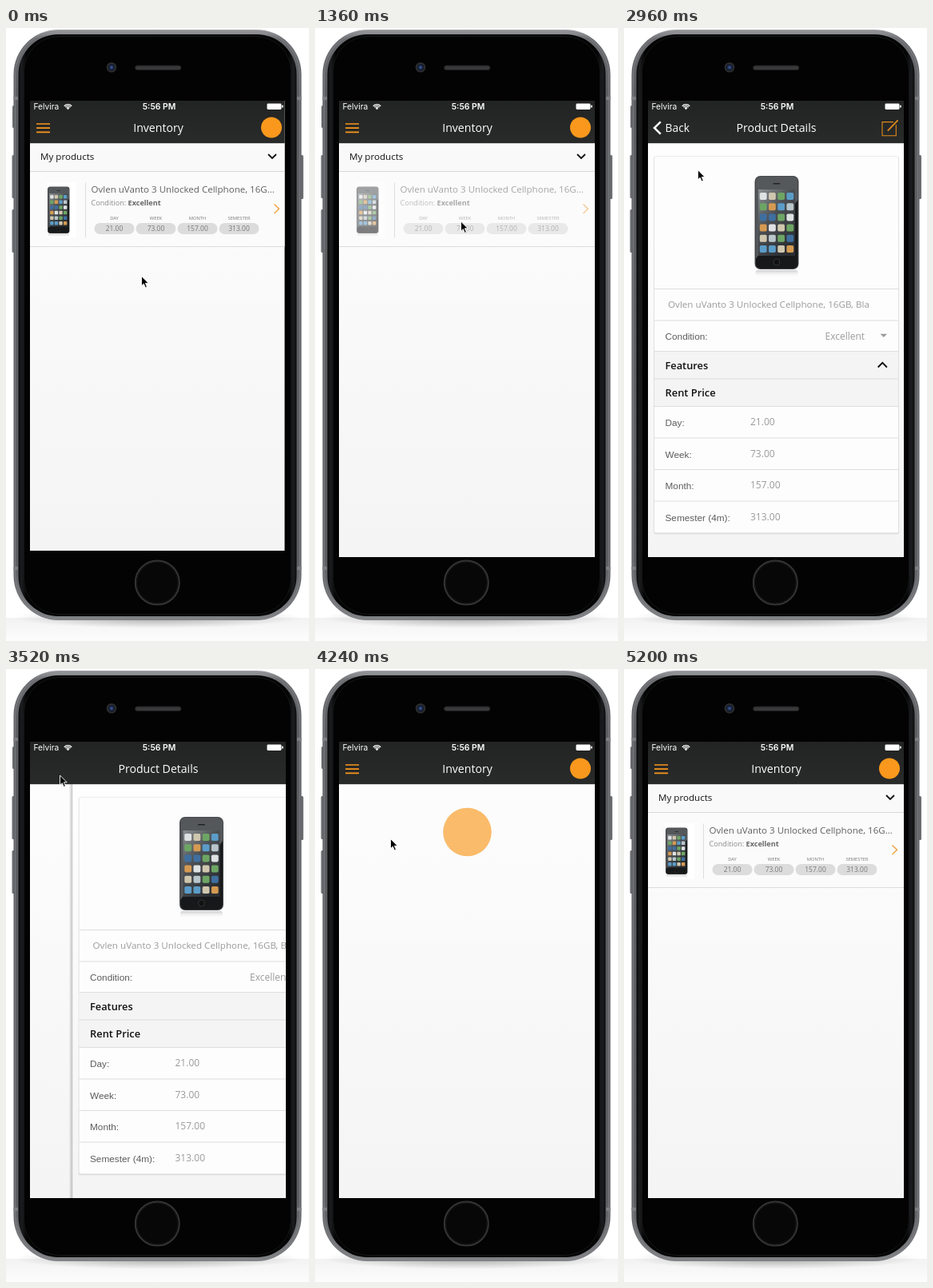
Write an HTML page that moves like this. It is 379 by 767 pixels and loops after 5.6 s.

```html
<!DOCTYPE html>
<html lang="en">
<head>
<meta charset="utf-8">
<title>Inventory app</title>
<style>
  html, body { margin: 0; width: 100%; height: 100%; overflow: hidden; background: #fff; }
  svg { display: block; width: 379px; height: 767px; }
  text { font-family: "Open Sans", "Noto Sans", sans-serif; white-space: pre; }
  .sys { font-family: Inter, Roboto, sans-serif; }
  .label { font-family: "Liberation Sans", Arial, sans-serif; font-size: 11.8px; fill: #5c5c5c; }
  .line { fill: none; stroke-linecap: butt; stroke-linejoin: miter; }
</style>
</head>
<body>
<svg id="stage" viewBox="0 0 379 767" xmlns="http://www.w3.org/2000/svg"></svg>
<script>
const LOOP = 5600, STEP = 80;
const ORANGE = '#f9981c';
const ITEM = 'Ovlen uVanto 3 Unlocked Cellphone, 16G';
const PRICES = [['Day', '21.00'], ['Week', '73.00'], ['Month', '157.00'], ['Semester', '313.00']];

const text = (x, y, size, fill, str, more = '') =>
  `<text x="${x}" y="${y}" font-size="${size}" fill="${fill}" ${more}>${str}</text>`;
const rect = (x, y, w, h, fill, r = 0, more = '') =>
  `<rect x="${x}" y="${y}" width="${w}" height="${h}" rx="${r}" fill="${fill}" ${more}/>`;
const line = (d, color, width) =>
  `<path class="line" d="${d}" stroke="${color}" stroke-width="${width}"/>`;
const grad = (id, stops, dir = 'x2="0" y2="1"') =>
  `<linearGradient id="${id}" ${dir}>` +
  stops.map(([o, c, a = 1]) => `<stop offset="${o}" stop-color="${c}" stop-opacity="${a}"/>`).join('') +
  '</linearGradient>';
const mid = 'text-anchor="middle"';

const defs = `<defs>
  ${grad('rim', [[0, '#a2a3a7'], [.015, '#6d6e72'], [.1, '#5f6064'], [.9, '#5f6064'], [1, '#808185']])}
  ${grad('gloss', [[0, '#0c0c0d'], [.012, '#1c1d1f'], [.03, '#040404'], [.97, '#040404'], [.988, '#1c1d1f'], [1, '#0c0c0d']], '')}
  ${grad('page', [[0, '#fefefe'], [1, '#f4f4f4']])}
  ${grad('bar', [[0, '#222323'], [1, '#292a2a']])}
  ${grad('edge', [[0, '#000', 0], [1, '#000', .24]], '')}
  ${grad('drop', [[0, '#000', .1], [1, '#000', .02]])}
  ${grad('glass', [[0, '#8b8f92'], [.45, '#4b4f53'], [1, '#2a2d31']], 'x2=".7" y2="1"')}
  ${grad('mirror', [[0, '#777', .35], [1, '#fff', 0]])}
  <radialGradient id="floor"><stop offset="0" stop-color="#000" stop-opacity=".3"/>
    <stop offset=".6" stop-color="#000" stop-opacity=".12"/><stop offset="1" stop-color="#000" stop-opacity="0"/></radialGradient>
  <radialGradient id="lens"><stop offset="0" stop-color="#4a66a8"/><stop offset=".5" stop-color="#1d2b52"/>
    <stop offset="1" stop-color="#111419"/></radialGradient>
  <clipPath id="screen"><rect id="screenBox" x="30" y="91" width="320" height="571"/></clipPath>
  <clipPath id="field"><rect x="50" y="330" width="256" height="32"/></clipPath>
</defs>`;

function device() {
  const keys = [[8, 97, 28], [7.5, 159, 54], [7.5, 227, 54], [368, 159, 55]]
    .map(([x, y, h]) => rect(x, y, 4, h, '#6f7074', 1.5)).join('');
  const bands = [86, 674].map(y =>
    rect(9.5, y, 5.5, 4, '#7d7e82') + rect(364, y, 5.5, 4, '#7d7e82')).join('');
  return rect(0, 738, 379, 29, 'url(#drop)', 0, 'opacity=".5"') +
    '<ellipse cx="189.5" cy="738" rx="180" ry="13" fill="url(#floor)"/>' + keys +
    rect(9.5, 2, 360, 739, 'url(#rim)', 56) +
    rect(11.5, 4, 356, 735, 'none', 54, 'stroke="#85868a" stroke-width="1" opacity=".7"') +
    bands +
    rect(15.5, 8, 348, 728, 'url(#gloss)', 50) +
    rect(22.5, 10.5, 334, 723, '#030303', 44, 'stroke="#151617" stroke-width="1"') +
    '<circle cx="132" cy="49.3" r="6.3" fill="#2c2e32"/><circle cx="132" cy="49.3" r="4.4" fill="url(#lens)"/>' +
    rect(161.5, 47, 57.5, 5.5, '#38383a', 2.75, 'stroke="#1d1d1e" stroke-width="1"') +
    '<circle cx="189.3" cy="694" r="27.5" fill="#070707" stroke="#343436" stroke-width="2"/>' +
    '<circle cx="189.3" cy="694" r="25.7" fill="none" stroke="#151516" stroke-width="1"/>';
}

// Flat handset picture, 55 x 117 units, lit from the upper left.
function handset(x, y, scale) {
  const tints = ['#dfe2e2', '#5b9cc8', '#d59a52', '#6da564', '#b9c6cc', '#cfc6ae', '#3f6f9f'];
  let icons = '';
  for (let r = 0; r < 6; r++)
    for (let c = 0; c < 4; c++)
      icons += rect(6.3 + c * 11.2, 21 + r * 13.2, 8.8, 9, tints[(r * 3 + c * 5 + (r * c) % 3) % 7], 1.8);
  return `<g transform="translate(${x} ${y}) scale(${scale})">` +
    rect(1, 118, 53, 9, 'url(#mirror)', 3) +
    rect(0, 0, 55, 117, '#4a4c4f', 7) + rect(1.2, 1, 52.8, 115, '#17181a', 6) +
    '<path d="M7 1 H48 Q54 1 54 7 V30 L1.2 104 V7 Q1.2 1 7 1 Z" fill="#55585b"/>' +
    rect(4.5, 17, 46, 83, 'url(#glass)') + icons +
    rect(23, 9, 9, 1.6, '#222', .8) +
    '<circle cx="27.5" cy="108" r="4" fill="#111" stroke="#3a3d40" stroke-width=".8"/></g>';
}

function listPage() {
  const chips = PRICES.map(([name, price], i) => {
    const x = 135.5 + i * 52;
    return text(x, 240, 5.8, '#777', name.toUpperCase(), mid) +
      rect(x - 25, 244, 50, 14, '#dcdcdc', 7) + text(x, 254.2, 8.5, '#777', price, mid);
  }).join('');
  return rect(30, 144, 320, 35.5, '#f9f9f9') + rect(30, 179, 320, 1, '#d8d8d8') +
    text(43, 165, 11.6, '#111', 'My products', 'font-weight="500"') +
    line('M328 158 L333 163 L338 158', '#111', 1.8) +
    rect(30, 180, 320, 93, '#fbfbfb') + rect(30, 273, 320, 1, '#dcdcdc') +
    rect(99, 193.5, 1, 69, '#dedede') +
    `<g id="item">${rect(51, 193, 37, 69, '#fff')}${handset(52, 198.5, .5)}` +
    text(106.5, 206.3, 11.55, '#606060', ITEM + '…') +
    text(106.5, 221.7, 9.1, '#8a8a8a', 'Condition: <tspan font-weight="700" fill="#666">Excellent</tspan>') +
    chips + line('M335.5 220.5 L341.5 226.2 L335.5 232', '#f0a040', 1.4) + '</g>';
}

function detailPage() {
  const rules = [326, 365.5, 404, 438.5, 473, 512.5, 552, 591.5]
    .map(y => rect(38, y, 305, 1, '#dedede')).join('');
  const rows = PRICES.map(([name, price], i) => {
    const y = 498 + i * 39.6;
    return `<text class="label" x="51.5" y="${y}">${name}${i === 3 ? ' (4m)' : ''}:</text>` +
      text(158, y - 1, 12, '#9b9b9b', price);
  }).join('');
  return rect(25, 144, 5, 518, 'url(#edge)') + rect(30, 144, 320, 518, 'url(#page)') +
    rect(37, 161, 307, 472.5, '#000', 2, 'opacity=".07"') +
    rect(37.5, 160.5, 306, 472, '#d9d9d9', 2) +
    rect(38, 161, 305, 470.5, '#fdfdfd', 1.5) +
    rect(38, 404, 305, 69, '#f4f4f4') + rules +
    handset(163.5, 185, 1) +
    `<g clip-path="url(#field)">${text(55, 350, 11.65, '#9b9b9b', ITEM + 'B, Black')}</g>` +
    '<text class="label" x="51.5" y="390">Condition:</text>' +
    text(251.5, 389.7, 12, '#9b9b9b', 'Excellent') +
    '<path d="M320.5 382.7 h8.6 l-4.3 4.4 z" fill="#9a9a9a"/>' +
    text(51.5, 426.5, 12.8, '#111', 'Features', 'font-weight="600"') +
    line('M317.7 424.5 L323.3 418.8 L328.9 424.5', '#111', 1.9) +
    text(51.5, 461, 12.9, '#111', 'Rent Price', 'font-weight="600"') + rows;
}

function header() {
  const arcs = [2.4, 4.4, 6.4].map(r => {
    const d = r * .74;
    return line(`M${77.5 - d} ${102 - r * .67} A${r} ${r} 0 0 1 ${77.5 + d} ${102 - r * .67}`, '#fff', 1.25);
  }).join('');
  return rect(30, 91, 320, 53, 'url(#bar)') + rect(30, 144, 320, 1, '#000', 0, 'opacity=".16"') +
    text(34.5, 101.6, 10.2, '#fff', 'Felvira', 'class="sys"') + arcs +
    '<circle cx="77.5" cy="101" r="1" fill="#fff"/>' +
    text(191.5, 101.7, 10.4, '#fff', '5:56 PM', `class="sys" font-weight="600" ${mid}`) +
    rect(326.5, 94.5, 18, 7.4, '#fff', 1.4) + rect(345.2, 96.6, 1.5, 3.2, '#fff', .7) +
    `<text id="title" x="190.5" y="130.3" font-size="14.1" font-weight="500" fill="#fff" ${mid}></text>` +
    `<g id="listBar">${line('M38 120 h17 M38 125.2 h17 M38 130.4 h17', ORANGE, 1.7)}` +
    `<circle cx="332" cy="124.5" r="13" fill="${ORANGE}"/></g>` +
    `<g id="detailBar">${line('M45.8 117.3 L38 125 L45.8 132.7', '#fff', 2.5)}` +
    text(51.5, 130.2, 13.9, '#fff', 'Back', 'font-weight="500"') +
    line('M337 117.6 H323 V134.8 H340.3 V121', '#e08a1c', 1.1) +
    line('M342.6 115.4 L332 126.4 L329.8 128.6', '#e08a1c', 1.8) + '</g>';
}

const stage = document.getElementById('stage');
stage.innerHTML = defs + device() + `<g clip-path="url(#screen)">
  ${rect(30, 91, 320, 571, 'url(#page)')}
  <g id="list">${listPage()}</g>
  <circle id="loader" cx="190.5" cy="204" r="30.3" fill="${ORANGE}"/>
  <g id="detail">${detailPage()}</g>
  ${header()}
</g>
<path id="cursor" d="M0 0 V12.2 L2.8 9.6 L4.9 14.4 L6.9 13.5 L4.9 8.8 H8.7 Z" fill="#000" stroke="#fff" stroke-width=".9"/>`;

const $ = id => document.getElementById(id);
const show = (id, on) => $(id).setAttribute('visibility', on ? 'visible' : 'hidden');

// [time, x, y]
const cursorPath = [
  [0, 169.5, 310.5], [560, 169.5, 310.5], [1120, 182.5, 242], [1680, 182.5, 242],
  [2080, 220.5, 417.5], [2320, 224, 429.5], [2480, 224, 429.5], [3120, 68, 131],
  [3520, 67.5, 133], [3840, 75.5, 179], [4240, 94.5, 212.5], [4480, 106, 217],
  [4720, 150, 198], [5040, 250, 122], [5120, 276, 94]
];
// [time, detail page offset]
const slide = [
  [0, 320], [1440, 320], [1520, 50], [1600, 0], [3440, 0], [3520, 53.5],
  [3600, 170], [3680, 262], [3760, 308], [3840, 320]
];
const press = [[0, 1], [1200, 1], [1280, .78], [1360, .55], [1520, .55], [1600, 1]];

function at(keys, t, i = 1, ease = k => k) {
  const n = keys.findIndex(key => key[0] > t);
  if (n < 0) return keys[keys.length - 1][i];
  const a = keys[n - 1], b = keys[n];
  return a[i] + (b[i] - a[i]) * ease((t - a[0]) / (b[0] - a[0]));
}
const smooth = k => k * k * (3 - 2 * k);

function draw(t) {
  const box = $('screenBox');
  box.setAttribute('width', t < 80 ? 318.5 : 320);
  box.setAttribute('height', t < 80 ? 563 : 571);

  const offset = at(slide, t);
  $('detail').setAttribute('transform', `translate(${offset} 0)`);
  show('detail', offset < 320);
  show('list', t < 3440 || t >= 4640);
  $('item').setAttribute('opacity', at(press, t));

  show('loader', t >= 3600 && t < 4640);
  $('loader').setAttribute('opacity', .77 + .12 * Math.cos((t - 3840) / 800 * 2 * Math.PI));

  const detail = t >= 1520 && t < 3600;
  $('title').textContent = detail ? 'Product Details' : 'Inventory';
  show('listBar', t < 1520 || t >= 3680);
  show('detailBar', t >= 1600 && t < 3440);

  // The long reaches ease at both ends.
  const ease = t < 1680 || (t >= 2480 && t < 3120) ? smooth : undefined;
  $('cursor').setAttribute('transform',
    `translate(${at(cursorPath, t, 1, ease)} ${at(cursorPath, t, 2, ease)})`);
  show('cursor', t < 5200);
}

const start = performance.now();
function tick() {
  const t = (performance.now() - start) % LOOP;
  draw(Math.floor(t / STEP) * STEP);
  requestAnimationFrame(tick);
}
tick();
</script>
</body>
</html>
```
